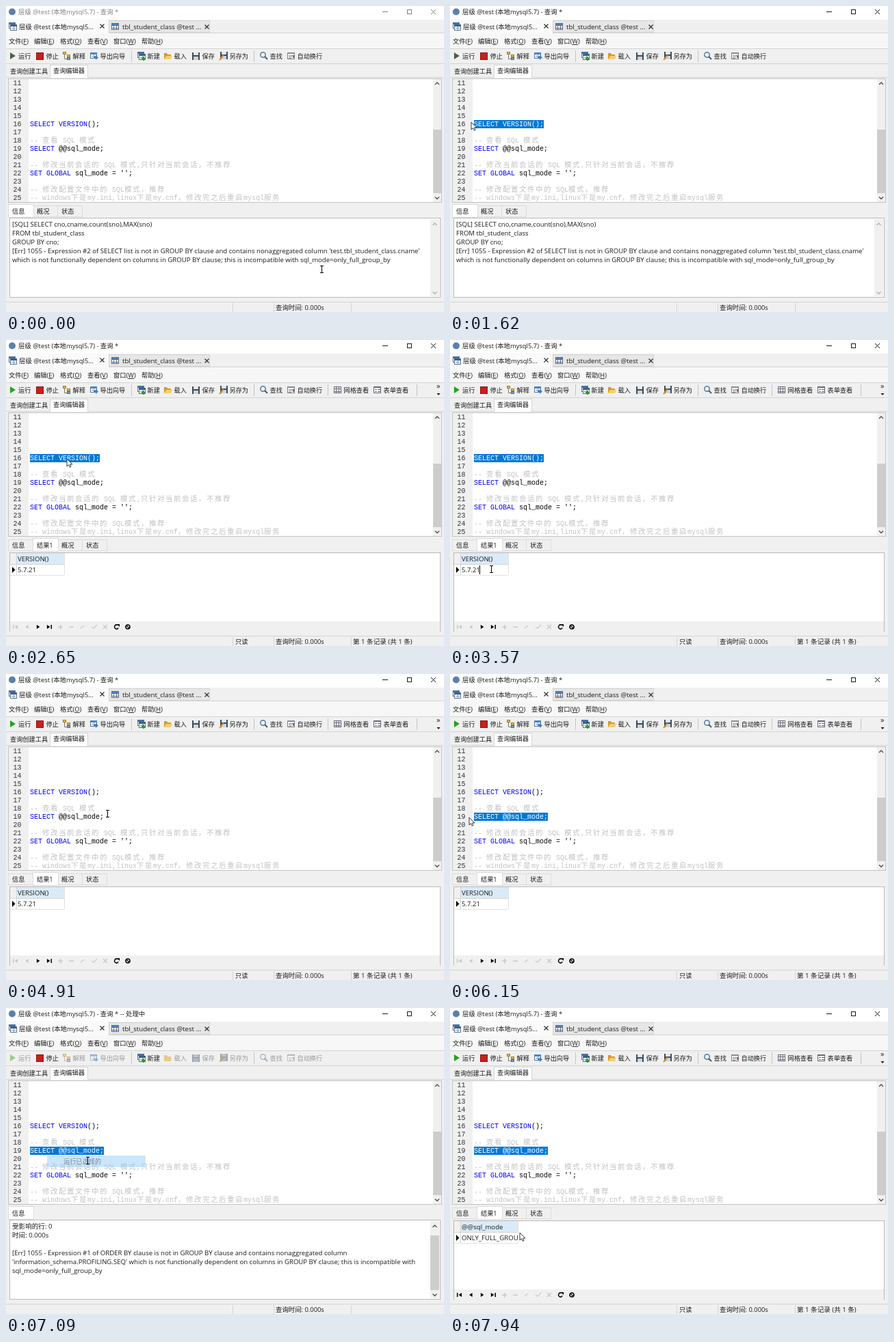
An HTML page with a canvas that plays this animation: 640 by 448 pixels, repeating every 8000 ms.

```html
<!DOCTYPE html>
<html lang="zh-CN">
<head>
<meta charset="utf-8">
<title>SQL 查询</title>
<style>
html, body { margin: 0; width: 100%; height: 100%; overflow: hidden; background: #f0f0f0; }
canvas { display: block; }
</style>
</head>
<body>
<canvas id="stage" width="640" height="448"></canvas>
<script>
const ctx = document.getElementById('stage').getContext('2d');
const LOOP = 8000;
const SANS = '"Open Sans", "Noto Sans CJK SC", "Noto Sans CJK JP", sans-serif';
const MONO = '"Liberation Mono", monospace';
const CJK = '"Noto Sans CJK SC", "Noto Sans CJK JP", sans-serif';
const FACE = '#f0f0f0', EDGE = '#d4d4d4', INK = '#1a1a1a', DIM = '#9a9a9a', BLUE = '#0078d7';

// Times of the two runs: popup opens, item clicked, error text, result grid
const RUNS = [
  { open: 1920, click: 2420, error: 2490, done: 2640, x: 65, y: 171 },
  { open: 6660, click: 7030, error: 7080, done: 7250, x: 57, y: 213 }
];

function box(x, y, w, h, fill, line) {
  if (fill) { ctx.fillStyle = fill; ctx.fillRect(x, y, w, h); }
  if (line) { ctx.strokeStyle = line; ctx.lineWidth = 1; ctx.strokeRect(x + .5, y + .5, w - 1, h - 1); }
}

function path(points, fill, line, width = 1) {
  ctx.beginPath();
  points.forEach(([x, y], i) => i ? ctx.lineTo(x, y) : ctx.moveTo(x, y));
  if (fill) { ctx.closePath(); ctx.fillStyle = fill; ctx.fill(); }
  if (line) { ctx.strokeStyle = line; ctx.lineWidth = width; ctx.stroke(); }
}

function ring(x, y, r, line, width = 1, from = 0, to = 7) {
  ctx.beginPath();
  ctx.arc(x, y, r, from, Math.min(to, from + Math.PI * 2));
  ctx.strokeStyle = line; ctx.lineWidth = width; ctx.stroke();
}

// y is the middle of the line
function text(s, x, y, color = INK, size = 9.6) {
  ctx.font = `${size}px ${SANS}`;
  ctx.fillStyle = color;
  ctx.fillText(s, x, y + 3.5);
}

const label = (s, x, y, color) => text(s, x, y, color, 9.2);

function cross(x, y, r, color, width = 1) {
  path([[x - r, y - r], [x + r, y + r]], null, color, width);
  path([[x + r, y - r], [x - r, y + r]], null, color, width);
}

// dir: 1 right/down, -1 left/up
const triX = (x, y, r, dir, color) => path([[x - r * dir * .7, y - r], [x + r * dir * .8, y], [x - r * dir * .7, y + r]], color);
const chevron = (x, y, dir, color) => path([[x - 3, y - 1.5 * dir], [x, y + 1.5 * dir], [x + 3, y - 1.5 * dir]], null, color, 1.4);

function sheet(x, y, color) {
  box(x, y, 10, 9, '#fff', '#5c6f86');
  box(x, y, 10, 3, color);
  box(x + 2, y + 5, 6, 1, '#8b9bb0');
  box(x + 5, y + 3, 1, 5, '#8b9bb0');
}

const icons = {
  run: (x, y, live) => path([[x + 1, y - 5], [x + 9, y], [x + 1, y + 5]], live ? '#1fa51f' : '#4e5f4e'),
  stop: (x, y) => box(x, y - 5, 11, 11, '#c8201a', '#8d1410'),
  explain: (x, y) => {
    box(x, y - 6, 5, 4, '#e8b545', '#a67c22');
    box(x + 6, y - 2, 5, 4, '#e8b545', '#a67c22');
    box(x + 6, y + 2, 5, 4, '#6f9bd0', '#48719f');
    path([[x + 2.5, y - 2], [x + 2.5, y + 4.5], [x + 6, y + 4.5]], null, '#777');
  },
  export: (x, y) => {
    sheet(x, y - 5, '#4a86c5');
    path([[x + 5, y + 1], [x + 8, y + 1], [x + 8, y - 1], [x + 12, y + 2.5], [x + 8, y + 6], [x + 8, y + 4], [x + 5, y + 4]], '#3f7fc6');
  },
  add: (x, y) => {
    sheet(x, y - 6, '#4a6f9c');
    sheet(x + 2, y - 3, '#3a5f91');
    box(x + 8, y + 1, 2, 6, '#2a9a35');
    box(x + 6, y + 3, 6, 2, '#2a9a35');
  },
  load: (x, y) => {
    path([[x, y + 5], [x, y - 4], [x + 4, y - 4], [x + 5, y - 2], [x + 10, y - 2], [x + 10, y + 5]], '#d39a2c');
    path([[x, y + 5], [x + 3, y], [x + 12, y], [x + 10, y + 5]], '#f5cf6d');
  },
  save: (x, y) => {
    box(x, y - 5, 11, 11, '#3f4b57');
    box(x + 2, y - 5, 7, 4, '#dfe8f1');
    box(x + 2, y + 1, 7, 5, '#cfd4da');
  },
  saveAs: (x, y) => {
    icons.save(x + 1, y - 1);
    path([[x, y + 6], [x + 6, y - 1]], null, '#d9902b', 2);
  },
  find: (x, y) => {
    ring(x + 4.5, y - 1.5, 3.7, '#52799f', 1.5);
    path([[x + 7, y + 1], [x + 11, y + 5]], null, '#4a5560', 2);
  },
  wrap: (x, y) => {
    box(x, y - 5, 11, 10, '#fff', '#7c7c7c');
    box(x, y - 5, 11, 2, '#7c8fa6');
    for (let i = 0; i < 3; i++) box(x + 2, y - 1 + i * 2, 6 - i, 1, '#888');
    box(x + 8, y - 1, 2, 4, '#cc4a36');
  },
  grid: (x, y) => {
    box(x, y - 5, 11, 10, '#fff', '#667');
    [3, 7].forEach(d => { box(x + d, y - 5, 1, 10, '#667'); box(x, y - 5 + d, 11, 1, '#667'); });
  },
  form: (x, y) => {
    box(x, y - 5, 11, 10, '#fff', '#667');
    box(x, y - 5, 11, 2, '#667');
    [-1, 2].forEach(d => { box(x + 2, y + d, 3, 1, '#667'); box(x + 6, y + d, 4, 1, '#667'); });
  }
};

// icon, x, label, stays enabled while a query runs
const TOOLS = [
  ['run', 5, '运行'], ['stop', 44, '停止', true], ['explain', 83, '解释'], ['export', 123, '导出向导'],
  ['add', 192, '新建', true], ['load', 231, '载入'], ['save', 272, '保存'], ['saveAs', 312, '另存为'],
  ['find', 371, '查找'], ['wrap', 411, '自动换行']
];
const GRID_TOOLS = [['grid', 479, '网格查看'], ['form', 537, '表单查看']];

function drawTop(t, busy, grid) {
  const ink = t < 500 ? '#808080' : INK;
  box(0, 0, 640, 20, '#fff');
  ctx.beginPath(); ctx.arc(9, 8.5, 5, 0, 7); ctx.fillStyle = '#5a80ad'; ctx.fill();
  text('层级 @test (本地mysql5.7) - 查询 *' + (busy ? ' -- 处理中' : ''), 18, 8.5, ink, 9.4);
  box(550, 8, 8, 1, ink);
  box(586, 5, 7, 7, null, ink);
  cross(624.5, 8.5, 3.5, ink);

  box(0, 20, 640, 20, FACE);
  box(0, 39, 640, 1, EDGE);
  box(150, 21, 148, 18, '#e6e6e6', EDGE);
  box(0, 19, 150, 21, '#fafafa');
  box(150, 20, 1, 20, EDGE);
  sheet(4, 24, '#4a6f9c'); sheet(6, 27, '#3a5f91');
  text('层级 @test (本地mysql5...', 19, 30, INK, 9.4);
  cross(140.5, 29.5, 3, '#333', 1.2);
  icons.grid(154, 30);
  box(155, 26, 9, 2, '#4a86c5');
  text('tbl_student_class @test ...', 170, 30.5, INK, 9.7);
  cross(293.5, 30.5, 3, '#333', 1.2);

  box(0, 40, 640, 22, '#f7f7f7');
  [['文件', 'F', 4], ['编辑', 'E', 41], ['格式', 'O', 79], ['查看', 'V', 119], ['窗口', 'W', 157], ['帮助', 'H', 198]]
    .forEach(([name, key, x]) => {
      text(`${name}(${key})`, x, 51, INK, 9.3);
      const left = ctx.measureText(name + '(').width;
      box(x + left, 56, ctx.measureText(key).width, 1, '#333');
    });

  box(0, 62, 640, 1, EDGE);
  TOOLS.concat(grid ? GRID_TOOLS : []).forEach(([icon, x, name, stays]) => {
    const off = busy && !stays;
    ctx.globalAlpha = off ? .45 : 1;
    icons[icon](x, 73, t >= 2420);
    ctx.globalAlpha = 1;
    label(name, x + (x === 5 ? 13 : 14.5), 73, off ? DIM : INK);
  });
  (grid ? [183, 362, 470, 600] : [183, 362]).forEach(x => box(x, 65, 1, 17, '#c4c4c4'));
  if (grid) {
    text('»', 629, 67, INK, 11);
    path([[629.5, 78], [634.5, 78], [632, 81]], INK);
  }
  box(0, 84, 640, 1, EDGE);
}

const CODE = {
  16: 'SELECT VERSION();',
  18: '-- 查看 SQL 模式',
  19: 'SELECT @@sql_mode;',
  21: '-- 修改当前会话的 SQL 模式,只针对当前会话，不推荐',
  22: "SET GLOBAL sql_mode = '';",
  24: '-- 修改配置文件中的 SQL模式，推荐',
  25: '-- windows下是my.ini,linux下是my.cnf，修改完之后重启mysql服务'
};
const rowY = n => 113 + (n - 11) * 12;

// Half-width characters take 6 px, full-width ones 12 px
function mono(s, x, y, color) {
  ctx.fillStyle = color;
  for (const ch of s) {
    const wide = ch > '\u2e80';
    ctx.font = wide ? `10.5px ${CJK}` : `10px ${MONO}`;
    ctx.fillText(ch, x, y + 3.2);
    x += wide ? 12 : 6;
  }
  return x;
}

function codeLine(n, white) {
  const s = CODE[n], y = rowY(n);
  if (s.startsWith('--')) return mono(s, 35, y, white ? '#fff' : '#c2c2c2');
  let x = 35;
  s.split(/\b(SELECT|VERSION|SET|GLOBAL)\b/).forEach((part, i) => {
    x = mono(part, x, y, white ? '#fff' : i % 2 ? '#0000ff' : '#000');
  });
}

function selectLine(n, from, to) {
  if (from >= to) return;
  ctx.save();
  ctx.beginPath(); ctx.rect(from, rowY(n) - 6, to - from, 12); ctx.clip();
  box(from, rowY(n) - 6, to - from, 12, BLUE);
  codeLine(n, true);
  ctx.restore();
}

const snap = x => Math.max(35, 35 + Math.round((x - 35) / 6) * 6);

function drawEditor(t, mouse) {
  label('查询创建工具', 6, 95.5);
  box(64, 86, 56, 19, '#fff', EDGE);
  label('查询编辑器', 69, 94.5);
  box(0, 104, 640, 1, EDGE);
  box(65, 104, 54, 1, '#fff');
  box(3, 106, 634, 182, '#fff', '#c3c3c3');
  box(4, 107, 29, 180, FACE);
  for (let n = 11; n <= 25; n++) mono(String(n), 10.5, rowY(n), '#333');
  Object.keys(CODE).forEach(n => codeLine(+n));

  if (t >= 1000 && t < 4860) selectLine(16, t < 1390 ? snap(mouse.x) : 35, 137);
  if (t >= 5850) selectLine(19, t < 6080 ? snap(mouse.x) : 35, 143);

  box(624, 107, 12, 180, FACE);
  box(624, 181, 12, 93, '#cdcdcd');
  chevron(630, 113.5, -1, '#505050');
  chevron(630, 281, 1, '#505050');
}

function drawTabs(names, active) {
  names.forEach((name, i) => {
    const x = 3 + i * 36;
    if (i !== active) box(x, 292, 37, 17, FACE, '#dcdcdc');
  });
  box(3 + active * 36, 290, 38, 20, '#fff', '#dcdcdc');
  names.forEach((name, i) => text(name, 9 + i * 36, 300, INK, 9.2));
}

function drawLog(lines, scrolled) {
  box(5, 310, 630, 117, '#fff', '#b9b9b9');
  lines.forEach((s, i) => text(s, 9, 319.5 + i * 12.9));
  box(620, 312, 13, 113, FACE);
  const tone = scrolled ? '#505050' : '#b4b4b4';
  chevron(626.5, 319.5, -1, tone);
  chevron(626.5, 420, 1, tone);
  if (scrolled) box(620, 333, 13, 80, '#cdcdcd');
}

function drawNav(atStart) {
  const y = 420, pale = '#c9c9c9', first = atStart ? pale : '#000';
  box(6, 412, 628, 15, FACE);
  box(10, y - 3, 1.5, 6, first); triX(15, y, 3, -1, first);
  triX(30.5, y, 3, -1, first);
  triX(47, y, 3, 1, '#000');
  triX(62, y, 3, 1, '#000'); box(65.5, y - 3, 1.5, 6, '#000');
  box(76, y - .5, 7, 1.5, pale); box(79, y - 3, 1.5, 7, pale);
  box(92, y - .5, 7, 1.5, pale);
  path([[109, y + 2], [114, y - 2]], null, pale, 1.3);
  path([[125, y], [128, y + 2], [133, y - 3]], null, pale, 1.3);
  cross(145, y, 3, pale, 1.3);
  ring(161.5, y, 3, '#000', 1.5, .5, 5.3);
  path([[162, y - 4], [166, y - 4], [166, y]], '#000');
  ring(178, y, 3, '#000', 1.6);
  path([[176, y - 2], [180, y + 2]], null, '#000', 1.2);
}

function drawGrid(t, head, value, right, atStart) {
  box(5, 311, 630, 116, '#fff', '#b9b9b9');
  box(6, 312, 9, 16, FACE);
  box(15, 312, right - 15, 16, '#d9ebf9');
  box(6, 328, right - 6, 1, EDGE);
  box(6, 344, right - 6, 1, '#e2e2e2');
  box(15, 312, 1, 32, EDGE);
  box(right, 312, 1, 32, '#e2e2e2');
  text(head, 17, 320.5);
  text(value, 17, 336.5);
  path([[9, 332], [13.5, 336.5], [9, 341]], '#000');
  if (t >= 3340 && t < 3830) box(43, 330, 1, 13, '#000');
  drawNav(atStart);
}

const ERR = '[Err] 1055 - Expression ';
const LOG_START = [
  '[SQL] SELECT cno,cname,count(sno),MAX(sno)', 'FROM tbl_student_class', 'GROUP BY cno;',
  ERR + "#2 of SELECT list is not in GROUP BY clause and contains nonaggregated column 'test.tbl_student_class.cname'",
  'which is not functionally dependent on columns in GROUP BY clause; this is incompatible with sql_mode=only_full_group_by'
];
const LOG_BUSY = [
  '受影响的行: 0', '时间: 0.000s', '',
  ERR + '#1 of ORDER BY clause is not in GROUP BY clause and contains nonaggregated column',
  "'information_schema.PROFILING.SEQ' which is not functionally dependent on columns in GROUP BY clause; this is incompatible with",
  'sql_mode=only_full_group_by'
];

function drawResult(t, run, grid) {
  if (grid) {
    drawTabs(['信息', '结果1', '概况', '状态'], 1);
    if (t < 7030) drawGrid(t, 'VERSION()', '5.7.21', 85, true);
    else drawGrid(t, '@@sql_mode', 'ONLY_FULL_GROU', 99, false);
  } else if (run) {
    drawTabs(['信息'], 0);
    if (t < run.error) drawLog([`[SQL] ${CODE[run === RUNS[0] ? 16 : 19]}`], false);
    else drawLog(LOG_BUSY, true);
  } else {
    drawTabs(['信息', '概况', '状态'], 0);
    drawLog(LOG_START, false);
  }

  box(0, 433, 640, 1, EDGE);
  [331, 391, 504].forEach(x => box(x, 435, 1, 13, EDGE));
  text('查询时间: 0.000s', 394, 441.5, INK, 9.4);
  if (grid) {
    label('只读', 335, 441.5);
    text('第 1 条记录 (共 1 条)', 507, 441.5);
  }
}

const MENU = ['运行已选择的', '', '剪切', '复制', '粘贴', '全选', '', '放大', '缩小', '重设', '查找'];

function menuHot(x, y) {
  box(x + 3, y + 3, 144, 17, '#91c9f7');
  label(MENU[0], x + 27, y + 11.5);
}

function drawMenu(t, run) {
  const { x, y } = run;
  if (t >= run.open && t < run.click) {
    ctx.globalAlpha = Math.min(1, (t - run.open) / 120);
    box(x + 2, y + 2, 150, 171, 'rgba(0,0,0,.2)');
    box(x, y, 150, 171, '#f2f2f2', '#b0b0b0');
    let top = y + 3;
    MENU.forEach(item => {
      if (item) label(item, x + 27, top + 8.5);
      else box(x + 25, top + 3, 121, 1, EDGE);
      top += item ? 17 : 6;
    });
    if (t > run.open + 130) menuHot(x, y);
  } else if (t >= run.click) {
    ctx.globalAlpha = Math.max(0, .66 - (t - run.click) / 320);
    menuHot(x, y);
  }
  ctx.globalAlpha = 1;
}

// time, x, y, shape reached at that time (b: text beam, a: arrow)
const MOUSE = [
  [70, 461, 385, 'b'], [540, 165, 209, 'b'], [760, 165, 209, 'b'], [1000, 138, 173, 'b'],
  [1390, 31, 170, 'a'], [1620, 31, 170, 'a'], [1900, 66, 171, 'a'], [2270, 88, 177, 'a'],
  [2880, 90, 173, 'b'], [3160, 62, 364, 'b'], [3340, 60, 335, 'b'], [3580, 60, 335, 'b'],
  [3830, 4, 331, 'a'], [3980, 4, 331, 'a'], [4200, 12, 344, 'a'], [4760, 142, 211, 'b'],
  [4990, 150, 202, 'b'], [5140, 155, 205, 'b'], [5370, 162, 208, 'b'], [5540, 172, 213, 'b'],
  [5690, 172, 213, 'b'], [5850, 144, 209, 'b'], [6080, 28, 210, 'a'], [6200, 28, 210, 'a'],
  [6300, 20, 207, 'a'], [6380, 36, 210, 'a'], [6550, 36, 210, 'a'], [6650, 57, 213, 'a'],
  [6870, 119, 219, 'a'], [7030, 119, 223, 'b'], [7280, 119, 223, 'b'], [7790, 108, 331, 'a'],
  [7860, 104, 329, 'a'], [7940, 102, 329, 'a']
];

function mouseAt(t) {
  const i = MOUSE.findIndex(k => k[0] > t);
  if (i === 0) return { x: MOUSE[0][1], y: MOUSE[0][2], shape: 'b' };
  const a = MOUSE[i < 0 ? MOUSE.length - 1 : i - 1], b = MOUSE[i] || a;
  const p = b === a ? 0 : (t - a[0]) / (b[0] - a[0]);
  const e = p * p * (3 - 2 * p);
  const x = a[1] + (b[1] - a[1]) * e, y = a[2] + (b[2] - a[2]) * e;
  return { x, y, shape: e < .85 ? a[3] : b[3] };
}

function drawMouse({ x, y, shape }) {
  x = Math.round(x); y = Math.round(y);
  if (shape === 'b') {
    box(x, y - 5, 1, 11, '#000');
    box(x - 2, y - 5, 5, 1, '#000');
    box(x - 2, y + 5, 5, 1, '#000');
  } else {
    const tip = [[0, 0], [0, 11], [2.5, 8.7], [4.3, 12.3], [6, 11.5], [4.5, 8], [8, 8], [0, 0]];
    path(tip.map(([dx, dy]) => [x + dx, y + dy]), '#fff', '#222', .9);
  }
}

function draw(t) {
  const run = RUNS.find(r => t >= r.click && t < r.done);
  const busy = !!run, grid = !busy && t >= RUNS[0].done;
  const mouse = mouseAt(t);
  box(0, 0, 640, 448, FACE);
  drawTop(t, busy, grid);
  drawEditor(t, mouse);
  drawResult(t, run, grid);
  RUNS.forEach(r => drawMenu(t, r));
  if (run !== RUNS[0]) drawMouse(mouse);
}

const start = performance.now();
function tick() {
  draw((performance.now() - start) % LOOP);
  requestAnimationFrame(tick);
}
tick();
</script>
</body>
</html>
```
